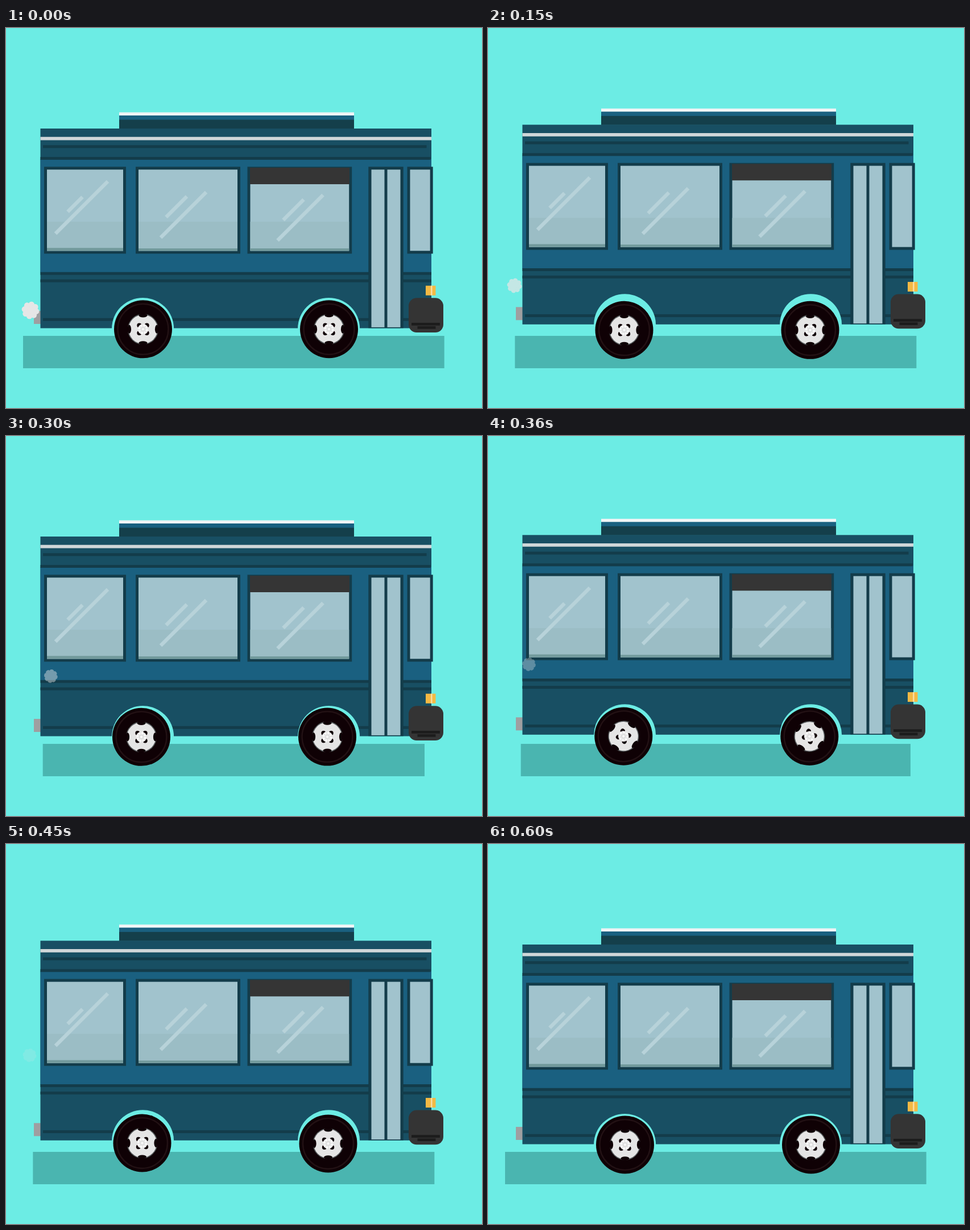
Recreate the animation shown at these times as an HTML page. Size 837 by 669 pixels, loop 630 ms.

```html
<!DOCTYPE html>
<html lang="en">
<head>
<meta charset="utf-8">
<title>Bouncing bus</title>
<style>
  html, body { margin: 0; width: 100%; height: 100%; overflow: hidden; background: #6cece4; }
  svg { display: block; }
</style>
</head>
<body>
<svg width="837" height="669" viewBox="0 0 837 669">
  <defs>
    <g id="wheel">
      <circle r="51" fill="#0f0105"/>
      <circle r="44.5" fill="none" stroke="#221114" stroke-width="2.5"/>
      <circle r="26.3" fill="#0b0506" stroke="#596062" stroke-width="1.4"/>
      <circle r="25.6" fill="#e5e5e5"/>
      <g id="bites" fill="#0f0105"></g>
      <circle r="9.4" fill="#e5e5e5"/>
      <circle r="7" fill="none" stroke="#fbfbfb" stroke-width="3.4" stroke-dasharray="3.6 1.9"/>
      <circle r="3" fill="#f6f6f6" stroke="#cfcfcf" stroke-width=".8"/>
    </g>
  </defs>

  <rect width="837" height="669" fill="#6cece4"/>
  <rect id="shadow" y="542" height="57" fill="#4ab5b0"/>

  <g id="bus">
    <rect x="49" y="498" width="12" height="23" fill="#9f9fa1"/>

    <!-- roof -->
    <rect x="199" y="148.5" width="413" height="6" fill="#f1f5f6"/>
    <rect x="199" y="154" width="413" height="8" fill="#1a6080"/>
    <rect x="199" y="161.5" width="413" height="16" fill="#143f4b"/>

    <!-- shell -->
    <rect x="60.5" y="177" width="687.5" height="351.5" fill="#184f63"/>
    <rect x="60.5" y="231" width="687.5" height="199.5" fill="#1a6080"/>
    <rect x="60.5" y="191.7" width="687.5" height="5.8" fill="#d0d7d9"/>
    <g fill="#133c4a">
      <rect x="65" y="206.3" width="674.5" height="5"/>
      <rect x="60.5" y="227" width="686" height="5"/>
      <rect x="60.5" y="429.7" width="687.5" height="5"/>
      <rect x="60.5" y="442.6" width="687.5" height="5"/>
      <rect x="65" y="510.7" width="650" height="5"/>
    </g>
    <g id="arches" fill="#6cece4"></g>
    <g id="windows"></g>

    <!-- door -->
    <rect x="637.3" y="244.3" width="61.4" height="284" fill="#133c4a"/>
    <rect x="642.5" y="249.3" width="23" height="277.6" fill="#a1c3cd"/>
    <rect x="670.5" y="249.3" width="23" height="277.6" fill="#a1c3cd"/>

    <!-- light and bumper -->
    <rect x="738" y="453.7" width="17.5" height="17" fill="#f3b944"/>
    <rect x="747" y="453.7" width="2.6" height="17" fill="#f9dca2"/>
    <rect x="708" y="475.3" width="61" height="60.7" rx="14" fill="#343434"/>
    <rect x="713" y="519" width="50" height="4.7" fill="#1c1c1c"/>
    <rect x="723.5" y="525" width="32" height="4.7" fill="#1c1c1c"/>
  </g>

  <use id="rear" href="#wheel"/>
  <use id="front" href="#wheel"/>
  <g id="smoke" fill="#e6e6e6"></g>
</svg>

<script>
const $ = id => document.getElementById(id);
const rect = (x, y, w, h, fill) =>
  `<rect x="${x}" y="${y}" width="${w}" height="${h}" fill="${fill}"/>`;
const around = (n, draw) =>
  Array.from({ length: n }, (_, i) => draw(i * 360 / n)).join('');

const pane = (x, w) =>
  rect(x, 244.3, w, 153, '#133c4a') + rect(x + 5, 249.3, w - 10, 143, '#a1c3cd');
const tint = (x, w, y) =>
  rect(x + 5, 341, w - 10, 51.3, '#9bbdc5') + rect(x + 5, y, w - 10, 392.3 - y, '#729a9c');
// Glare runs up and to the right at 45 degrees.
const glare = (x, y, len) =>
  `<path d="M${x} ${y}l${len} ${-len}" stroke="#b7d2d9" stroke-width="6.5"/>`;

$('windows').innerHTML =
  pane(67, 144) + tint(67, 144, 387.2) + glare(87, 362, 92) + glare(108.5, 323.5, 26) +
  pane(228, 184) + tint(228, 184, 388) + glare(272, 369, 80) + glare(281.5, 333, 36.5) +
  pane(424.5, 183.7) + tint(424.5, 183.7, 388) + glare(477.5, 374, 80) + glare(487.5, 338, 36) +
  rect(429, 246, 175, 29, '#353535') +
  pane(705.5, 45.2);

$('arches').innerHTML = [240.6, 567.6].map(x =>
  `<path d="M${x - 54.5} 529a54.5 54 0 0 1 109 0z"/>`).join('');

$('bites').innerHTML = around(4, a =>
  `<g transform="rotate(${a})"><ellipse cy="-24.3" rx="7.5" ry="3.4"/>` +
  '<circle cx="6.7" cy="-6.7" r="4"/></g>');

$('smoke').innerHTML = '<circle r="11.5"/>' + around(8, a =>
  `<circle cx="10.3" r="5.2" transform="rotate(${a + 10})"/>`);

const LOOP = 630, STEP = 30, CYCLE = 600;
const puff = [[0, 43, 497], [60, 27.5, 469], [150, 46.5, 453.5], [240, 77, 441],
              [360, 72, 402], [450, 41.5, 372], [540, 25, 342]];
const rearLift = [[0, 1.1], [150, 1.1], [240, .9], [360, .3], [450, -1.2], [600, .2]];
const frontLift = [[0, 1], [150, 1.1], [240, .2], [360, .6], [450, -.3], [600, .2]];

const segment = (pts, t) => {
  let i = 0;
  while (i < pts.length - 2 && t >= pts[i + 1][0]) i++;
  return i;
};

function linear(pts, t) {
  const i = segment(pts, t), [t0, a] = pts[i], [t1, b] = pts[i + 1];
  return a + (b - a) * (t - t0) / (t1 - t0);
}

// Smooth cubic through the points; k picks the coordinate.
function spline(pts, t, k) {
  const slope = j => {
    const a = pts[Math.max(j - 1, 0)], b = pts[Math.min(j + 1, pts.length - 1)];
    return (b[k] - a[k]) / (b[0] - a[0]);
  };
  const i = segment(pts, t), p = pts[i], q = pts[i + 1], d = q[0] - p[0];
  const u = (t - p[0]) / d, v = 1 - u;
  return v * v * (1 + 2 * u) * p[k] + u * u * (3 - 2 * u) * q[k] +
         u * v * d * (v * slope(i) - u * slope(i + 1));
}

// 0 -> 1 -> 0 over one period
const tri = (t, period) => 1 - Math.abs(1 - 2 * (t % period) / period);
const place = (id, value) => $(id).setAttribute('transform', value);

function roll(id, x, lift, t) {
  const deg = t / CYCLE * 360, a = deg * Math.PI / 180;
  const cx = x + 1.5 * Math.cos(a), cy = 529.2 + 1.5 * Math.sin(a) + linear(lift, t);
  place(id, `translate(${cx} ${cy}) rotate(${deg})`);
}

function render(t) {
  const inset = 34.7 * tri(t, CYCLE);
  $('shadow').setAttribute('x', 30 + inset);
  $('shadow').setAttribute('width', 740.7 - 2 * inset);
  place('bus', `translate(0 ${-6.7 * tri(t, CYCLE / 2)})`);
  roll('rear', 239.5, rearLift, t);
  roll('front', 566.5, frontLift, t);

  const s = Math.min(t, 540);
  const size = Math.max(.77, 1 - s * .00105);
  place('smoke', `translate(${spline(puff, s, 1)} ${spline(puff, s, 2)}) scale(${size})`);
  $('smoke').setAttribute('opacity', 1 - s / 540);
}

const start = performance.now();
function tick() {
  const t = (performance.now() - start) % LOOP;
  render(Math.floor(t / STEP) * STEP);
  requestAnimationFrame(tick);
}
tick();
</script>
</body>
</html>
```
